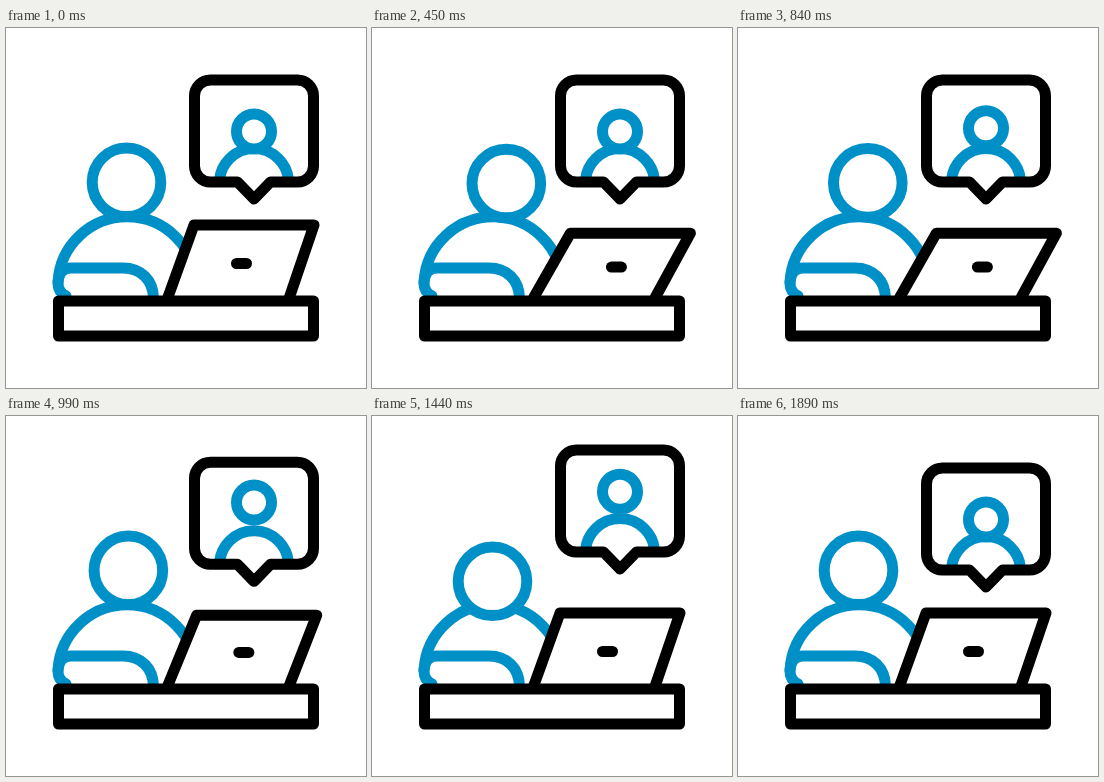
These frames come from a looping animation (360 px wide and 360 px high, 1.92 s). An HTML page:

```html
<!DOCTYPE html>
<html lang="en">
<head>
<meta charset="utf-8">
<title>Video call</title>
<style>
  html, body { margin: 0; width: 100%; height: 100%; overflow: hidden; background: #fff; }
  svg { display: block; width: 100vw; height: 100vh; }
  .ink, .blue { fill: none; stroke: #000; stroke-width: 11; stroke-linecap: round; stroke-linejoin: round; }
  .blue { stroke: #0090c8; }
  .solid { fill: #fff; }
</style>
</head>
<body>
<svg viewBox="0 0 360 360">
  <defs>
    <clipPath id="window"><rect x="188" y="52" width="120" height="98"/></clipPath>
  </defs>

  <path class="blue" d="M60 268Q52 264 52 255Q53 240 65 240H117C135 240 147 252 147.500 270"/>
  <path class="blue" d="M52 254A69.2 69.2 0 0 1 121 188.800A69.2 69.2 0 0 1 190.200 258"/>
  <circle id="head" class="blue solid" r="34.3"/>

  <path id="laptop" class="ink solid"/>
  <path id="mark" class="ink" d="M-5 0H5"/>
  <rect class="ink solid" x="52.5" y="273" width="255" height="35"/>

  <g id="bubble">
    <g clip-path="url(#window)">
      <path class="blue" d="M213.500 185V155A34.5 34.5 0 0 1 282.500 155V185"/>
      <circle id="callerHead" class="blue solid" cx="248" cy="103.500" r="17.500"/>
    </g>
    <path class="ink" d="M204.500 52H291.500A16 16 0 0 1 307.500 68V138A16 16 0 0 1 291.500 154H264.500L248 171L231.500 154H204.500A16 16 0 0 1 188.500 138V68A16 16 0 0 1 204.500 52Z"/>
  </g>
</svg>
<script>
  const LOOP = 1920, STEP = 30;
  const part = id => document.getElementById(id);
  const [head, laptop, mark, bubble, callerHead] =
    ['head', 'laptop', 'mark', 'bubble', 'callerHead'].map(part);

  const ease = (t, from, to) => {
    const u = Math.min(1, Math.max(0, (t - from) / (to - from)));
    return u * u * (3 - 2 * u);
  };
  // Rises from a to b, holds, then falls from c to d.
  const pulse = (t, a, b, c, d) => ease(t, a, b) - ease(t, c, d);
  const move = (el, x, y) => el.setAttribute('transform', `translate(${x} ${y})`);

  function draw(t) {
    const lean = pulse(t, 20, 405, 690, 1080) * 0.183;
    const nod = 11 * pulse(t, 1140, 1440, 1440, 1740);
    move(head, 120.5 + 76 * Math.sin(lean), 230.3 - 76 * Math.cos(lean) + nod);

    const tilt = pulse(t, 188, 580, 710, 1100);
    const x = 188 + 14 * tilt, y = 197 + 11 * tilt;
    laptop.setAttribute('d', `M162 269L${x} ${y}H${x + 120}L283.500 269`);
    move(mark, 235.5 + 12 * tilt, 235.5 + 4.8 * tilt);

    move(bubble, 0, -19 * pulse(t, 865, 1210, 1390, 1755));
    move(callerHead, 0, -16 * pulse(t, 720, 1140, 1260, 1680));
  }

  const start = performance.now();
  function tick() {
    const t = (performance.now() - start) % LOOP;
    draw(Math.floor(t / STEP) * STEP);
    requestAnimationFrame(tick);
  }
  tick();
</script>
</body>
</html>
```
